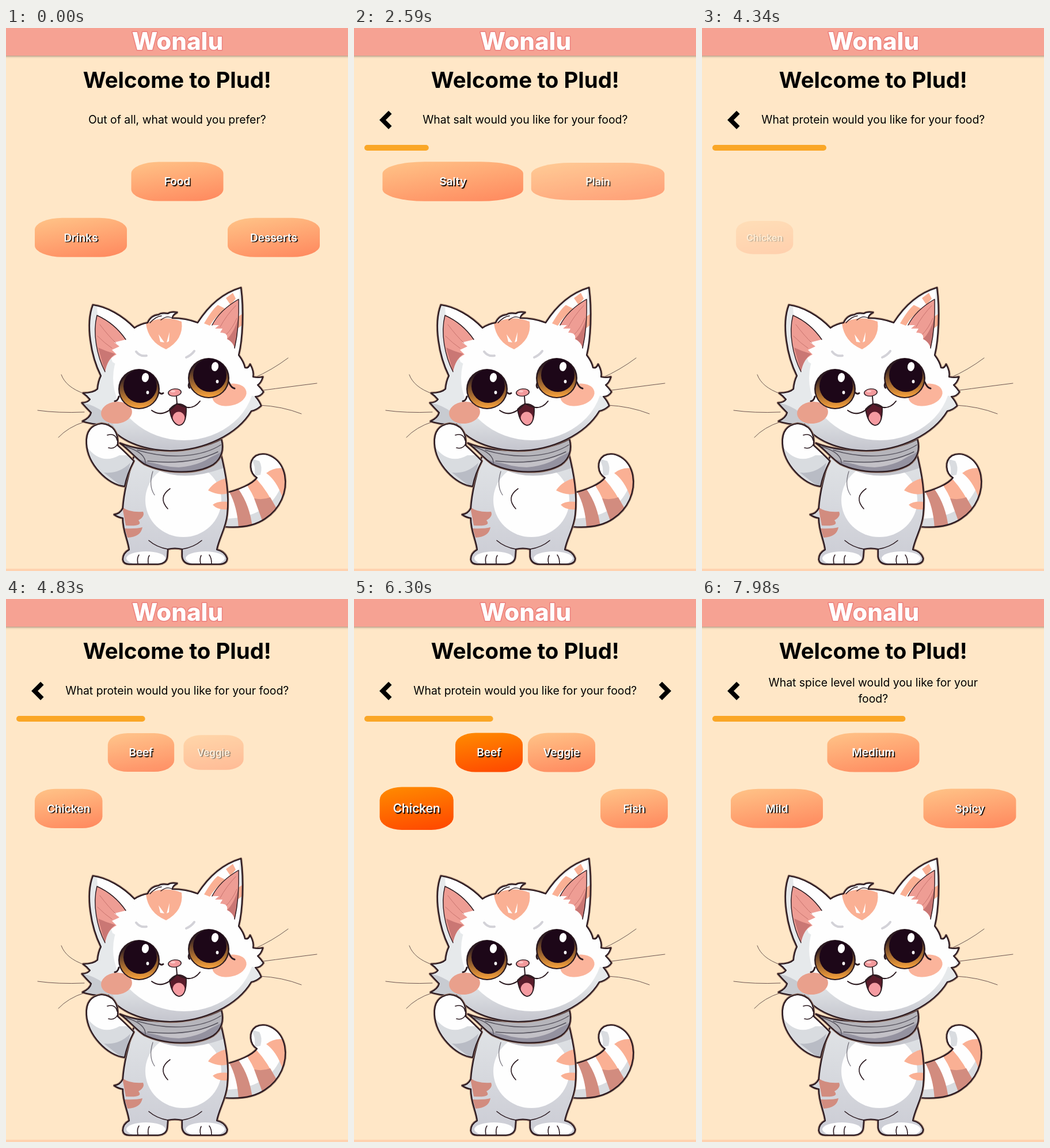
An HTML page with a canvas that plays this animation: 594x943 px, repeating every 8 s.

```html
<!DOCTYPE html>
<html lang="en">
<head>
<meta charset="utf-8">
<title>Menu quiz</title>
<style>
  html, body { margin: 0; width: 100%; height: 100%; overflow: hidden; background: #ffe7c7; }
  canvas { display: block; width: 594px; height: 943px; }
</style>
</head>
<body>
<canvas id="stage"></canvas>
<script>
const W = 594, H = 943, LOOP = 8000;
const FONT = 'Inter, "Open Sans", sans-serif';
const ratio = window.devicePixelRatio || 1;

function setup(canvas) {
  canvas.width = W * ratio;
  canvas.height = H * ratio;
  const context = canvas.getContext('2d');
  context.scale(ratio, ratio);
  return context;
}
let ctx = setup(document.getElementById('stage'));
const layer = setup(document.createElement('canvas'));

const INK = '#2b1a20', FRINGE = '#8d6d60', SALMON = '#fab094', DUSK = '#d28c7f';
const GREY = '#d9dce0', WHITE = '#fefefe';

const clamp = v => Math.max(0, Math.min(1, v));

// cubic-bezier(.25, .1, .25, 1)
function ease(x) {
  x = clamp(x);
  if (x === 0 || x === 1) return x;
  const bez = (s, a, b) => 3 * a * s * (1 - s) ** 2 + 3 * b * s * s * (1 - s) + s ** 3;
  let lo = 0, hi = 1;
  for (let i = 0; i < 20; i++) {
    const mid = (lo + hi) / 2;
    if (bez(mid, .25, .25) < x) lo = mid; else hi = mid;
  }
  return bez(lo, .1, 1);
}

const button = (label, x, y, w, opts = {}) => ({ label, x, y, w, ...opts });
const TOP = 266.5, LOW = 363.8;

// start: page appears; t0: its motion begins; arrow: "next" becomes available
const pages = [
  {
    start: 0, t0: -5000, bar: [0, 0], arrow: 1120, press: [[1540, 1680], [1820, 2030]],
    text: ['Out of all, what would you prefer?'],
    buttons: [
      button('Drinks', 130, LOW, 160),
      button('Food', 297.5, TOP, 160, { hover: [330, 1440], picked: 1120 }),
      button('Desserts', 465, LOW, 160)
    ]
  },
  {
    start: 2030, t0: 2030, bar: [0, .2], arrow: 3220, press: [[3990, 4200]], back: true,
    text: ['What salt would you like for your food?'],
    buttons: [
      button('Salty', 171.7, TOP, 243, { hover: [2930, 3410], picked: 3220 }),
      button('Plain', 423.5, TOP, 243, { hover: [3450, 3620] })
    ]
  },
  {
    start: 4200, t0: 4200, bar: [.2, .4], arrow: 5460, press: [[6790, 7070]], back: true,
    text: ['What protein would you like for your food?'],
    buttons: [
      button('Chicken', 108.7, LOW, 117, { hover: [5750, 6290], picked: 6090 }),
      button('Beef', 234.5, TOP, 117, { hover: [5030, 5720], picked: 5460 }),
      button('Veggie', 360.5, TOP, 117),
      button('Fish', 486.5, LOW, 117)
    ]
  },
  {
    start: 7070, t0: 7020, bar: [.4, .6], arrow: Infinity, press: [], back: true,
    text: ['What spice level would you like for your', 'food?'],
    buttons: [
      button('Mild', 130, LOW, 160),
      button('Medium', 297.5, TOP, 160),
      button('Spicy', 465, LOW, 160)
    ]
  }
];

function type(str, x, y, font, color) {
  ctx.font = font + ' ' + FONT;
  ctx.textAlign = 'center';
  ctx.fillStyle = color;
  ctx.fillText(str, x, y);
}

// Paint as one group, then blend the group at the given opacity.
function group(alpha, paint) {
  const base = ctx;
  ctx = layer;
  ctx.clearRect(0, 0, W, H);
  paint();
  ctx = base;
  ctx.globalAlpha = alpha;
  ctx.drawImage(layer.canvas, 0, 0, W, H);
  ctx.globalAlpha = 1;
}

function drawButton(b, i, t, t0) {
  const age = t - t0 - 40 - 200 * i;
  const p = clamp(age / 420);
  if (p === 0) return;
  let scale = .8 + .2 * p + .006 * Math.sin(Math.PI * clamp((age - 420) / 250));
  if (b.hover) scale *= 1 + .1 * (ease((t - b.hover[0]) / 180) - ease((t - b.hover[1]) / 180));

  const w = b.w, h = 68, a = 170 * Math.PI / 180;
  const len = (w * Math.sin(a) - h * Math.cos(a)) / 2;
  const dx = Math.sin(a) * len, dy = -Math.cos(a) * len;
  const on = t >= b.picked;

  group(p, () => {
    const shade = ctx.createLinearGradient(-dx, -dy, dx, dy);
    shade.addColorStop(0, on ? '#ff8c00' : '#ffc488');
    shade.addColorStop(1, on ? '#ff4500' : '#ff875d');
    ctx.save();
    ctx.translate(b.x, b.y);
    ctx.scale(scale, scale);
    ctx.fillStyle = shade;
    ctx.beginPath();
    ctx.roundRect(-w / 2, -h / 2, w, h, { x: w * .3, y: h * .3 });
    ctx.fill();
    ctx.shadowColor = '#000';
    ctx.shadowOffsetX = ctx.shadowOffsetY = 1.7 * ratio;
    ctx.shadowBlur = ratio;
    type(b.label, 0, 6.8, '600 19px', '#fff');
    ctx.restore();
  });
}

function chevron(x, dir, scale = 1) {
  ctx.save();
  ctx.translate(x, 159.8);
  ctx.scale(dir * scale, scale);
  ctx.beginPath();
  ctx.moveTo(-8, -13.2);
  ctx.lineTo(5.2, 0);
  ctx.lineTo(-8, 13.2);
  ctx.lineWidth = 7.8;
  ctx.lineJoin = 'miter';
  ctx.lineCap = 'butt';
  ctx.strokeStyle = '#000';
  ctx.stroke();
  ctx.restore();
}

function drawHeader() {
  ctx.save();
  ctx.shadowColor = 'rgba(70, 50, 40, .55)';
  ctx.shadowBlur = 4 * ratio;
  ctx.shadowOffsetY = ratio;
  ctx.fillStyle = '#f6a293';
  ctx.fillRect(-5, -5, W + 10, 53);
  ctx.restore();
  ctx.lineJoin = 'round';
  ctx.lineWidth = 3;
  ctx.strokeStyle = '#ec7f7c';
  ctx.font = '800 42px ' + FONT;
  ctx.textAlign = 'center';
  ctx.strokeText('Wonalu', 298, 38);
  type('Wonalu', 298, 38, '800 42px', '#fff');
}

function drawPage(page, t) {
  const first = page.text.length > 1 ? 151.6 : 166.2;
  page.text.forEach((line, i) => type(line, 297.3, first + i * 28.8, '400 19.4px', '#000'));
  if (page.back) chevron(54.8, -1);
  if (t >= page.arrow) {
    const big = page.press.some(([from, to]) => t >= from && t < to);
    chevron(540.3, 1, big ? 1.1 : 1);
  }
  const [from, to] = page.bar;
  const width = 559 * (from + (to - from) * ease((t - page.t0) / 300));
  if (width > 0) {
    ctx.fillStyle = '#faa727';
    ctx.beginPath();
    ctx.roundRect(18, 203, width, 10, 5);
    ctx.fill();
  }
  page.buttons.forEach((b, i) => drawButton(b, i, t, page.t0));
}

// --- cat ---
const shape = d => new Path2D(d);
const TAIL = shape('M380 808C405 802 428 792 436 781C423 773 421 752 434 743C452 734 478 747 484 777C489 805 476 835 450 852C430 866 405 868 380 866Z');
const BODY = shape('M222 745C212 780 205 805 203 834Q198 844 188 845Q195 850 203 851C203 875 212 888 214 906Q203 912 203 923Q204 931 214 931L264 931Q279 930 280 918L281 905Q293 902 306 905L306 918Q308 931 322 931L372 931Q384 930 384 921Q380 909 366 906C370 885 382 868 384 845C388 810 382 775 372 735Z');
const ARM = shape('M194 725Q196 690 166 687Q138 691 140 722C142 757 176 793 206 796Q210 775 222 752Q206 736 194 725Z');
const SCARF = shape('M198 721C245 740 330 738 374 714C379 732 374 748 360 758C330 776 275 774 240 757C226 748 212 730 198 721Z');
const HEAD = shape('M165 604C148 570 138 515 151 481C175 484 203 500 223 521Q234 514 246 512Q252 499 265 498Q270 494 281 496Q287 492 297 494Q288 499 289 504Q312 504 333 512C352 482 378 460 408 451C413 490 411 540 404 568Q413 580 415 590Q421 592 424 584Q431 597 429 606Q438 608 446 606Q443 616 437 620Q443 626 447 632Q442 640 433 640Q440 648 443 656Q434 664 426 665C402 705 345 734 285 734C235 733 195 715 178 688Q155 690 133 683Q146 677 148 668Q140 660 132 651Q142 651 146 645Q140 638 134 634Q152 634 159 627Q160 614 165 604Z');

function fill(path, color) {
  ctx.fillStyle = color;
  ctx.fill(typeof path === 'string' ? shape(path) : path);
}

function line(path, width = 2, color = INK) {
  ctx.lineWidth = width;
  ctx.strokeStyle = color;
  ctx.stroke(typeof path === 'string' ? shape(path) : path);
}

function oval(x, y, rx, ry, color, tilt = 0) {
  ctx.fillStyle = color;
  ctx.beginPath();
  ctx.ellipse(x, y, rx, ry, tilt, 0, 7);
  ctx.fill();
}

function fadeDown(y1, y2, from, to) {
  const g = ctx.createLinearGradient(0, y1, 0, y2);
  g.addColorStop(0, from);
  g.addColorStop(1, to);
  return g;
}

// Fill a part, paint its details inside the edge, then outline it.
function part(path, color, details) {
  line(path, 4.4, FRINGE);
  fill(path, color);
  ctx.save();
  ctx.clip(path);
  details();
  ctx.restore();
  line(path, 2.2);
}

function eye(x, y) {
  oval(x, y, 36, 35, INK);
  oval(x, y + 1, 33.5, 32, fadeDown(y - 22, y + 32, INK, '#f5a03c'));
  oval(x + 2, y - 5, 29, 29, '#1d0718');
  oval(x + 11, y - 20, 6, 8, '#fff', .2);
  oval(x + 15, y + 6, 2.4, 3, '#fff');
}

function drawTail() {
  part(TAIL, WHITE, () => {
    fill('M380 868L380 852C430 852 466 832 480 790L495 790L470 870Z', GREY);
    fill('M426 748Q434 760 432 778L442 776Q446 762 440 752Z', GREY);
    fill('M388 806L404 801Q424 830 428 868L404 870Q402 832 388 806Z', DUSK);
    fill('M418 793L434 782Q456 806 470 838L446 858Q436 820 418 793Z', SALMON);
    fill('M431 817Q446 820 459 815L472 838L446 858Z', DUSK);
    fill('M452 773Q466 762 484 765L492 800Q484 808 480 815Q470 786 452 773Z', SALMON);
  });
}

function drawBody() {
  part(BODY, fadeDown(750, 915, '#dfe2e5', '#cdced6'), () => {
    oval(308, 820, 66, 64, WHITE);
    oval(243, 921, 34, 12, WHITE);
    oval(346, 921, 34, 12, WHITE);
    fill('M226 740Q280 800 378 764L375 735Z', '#c3c4cb');
    fill('M386 781Q362 786 351 803Q370 813 386 808Z', SALMON);
    fill('M386 823Q368 821 359 828Q368 838 386 836Z', SALMON);
    fill('M202 832Q215 842 238 840Q242 848 230 855Q240 866 208 864Z', DUSK);
    fill('M206 869Q226 870 237 867Q234 884 211 885Z', DUSK);
  });
  line('M285 800Q263 815 281 835', 1.6);
  line('M255 770Q247 795 258 811', 1.3, '#77747d');
  line('M281 905Q262 902 248 890M306 905Q326 902 340 890', 1.6);
  line('M229 930Q227 920 231 915M247 930Q246 920 249 916M338 930Q336 921 339 916M357 930Q357 920 353 915', 1.6);
}

function drawArm() {
  part(ARM, WHITE, () => {
    fill('M140 727Q165 760 197 742L224 742L210 800Q160 790 140 727Z', GREY);
    fill('M170 772Q196 775 216 755L206 800Z', '#b9bcc5');
  });
  line('M176 707Q190 703 193 716M178 729Q189 732 194 722', 1.6);
}

function drawScarf() {
  part(SCARF, '#b6b5bb', () => {
    fill('M230 749C280 766 335 760 376 735L370 780L250 775Z', '#9492a0');
    fill('M250 752C290 760 330 755 366 736Q345 759 300 763Q270 762 250 752Z', '#c3c1c7');
  });
  line('M208 727Q244 738 242 757M228 733C290 752 345 742 373 724M246 752C300 758 340 750 368 736', 1.4, '#56535e');
}

function drawHead() {
  part(HEAD, fadeDown(660, 730, '#e6e9eb', '#c6c7cf'), () => {
    fill('M158 484Q200 492 226 518L250 505L300 492L335 512Q365 470 405 454L408 560L430 590L445 610L440 640L250 620L185 580L160 510Z', WHITE);
    oval(309, 608, 123, 108, WHITE);
    fill('M130 650Q180 660 190 700L130 690Z', '#c8cbd1');
    fill('M243 513Q275 497 305 510Q309 541 278 558Q247 545 243 513Z', SALMON);
    fill('M265 532L275 546L268 545ZM284 528L283 544L279 546Z', WHITE);
    fill('M344 513Q358 489 368 481L384 489Q365 498 354 517Z', SALMON);
    fill('M382 469L394 460L399 470L390 481Z', SALMON);
    fill('M402 502L413 495L413 514L402 522Z', SALMON);
  });
  fill('M158 499C150 530 158 570 172 597Q176 574 192 567L184 559L197 553L188 546L208 541C195 522 178 508 158 499Z', '#ee9d94');
  fill('M404 471C380 485 366 500 358 516L370 516L363 522L376 522L372 529Q386 529 384 540Q395 545 397 556C403 530 405 500 404 471Z', '#ee9d94');
  fill('M160 555Q175 562 190 566Q176 575 172 597Z', '#ca7774');
  fill('M403 505Q395 530 384 540Q394 545 397 556Q403 535 403 505Z', '#ca7774');
  line('M172 597C158 570 150 530 158 499C178 508 195 522 208 541M358 516C366 500 380 485 404 471C405 500 403 530 397 556', 1.4);
  line('M163 515Q178 535 191 547M159 535Q172 548 184 556M399 482Q382 500 372 519M401 504Q393 522 383 532', 1, '#c9746f');
  line('M250 512Q260 501 270 500M269 507Q280 498 289 504', 1.4);
}

function drawFace() {
  oval(192, 668, 27, 19, '#e9a08c', -.1);
  oval(388, 637, 30, 19, '#fbb49b', -.2);
  line('M226 562Q233 571 244 569M313 572Q322 568 327 561', 4, '#d3d2d8');
  eye(231, 627);
  eye(352, 608);
  line('M196 640Q194 648 189 648M266 633Q270 637 273 634M318 617Q316 623 319 625M387 615Q391 625 397 626', 3);
  oval(293, 633, 12, 7, INK, -.1);
  oval(293, 633, 10.5, 5.8, '#f39a9c', -.1);
  oval(290, 631, 4, 1.8, '#fbc9c8');
  fill('M284 662Q298 646 313 658Q314 690 300 690Q288 687 284 662Z', '#5a1c2b');
  oval(300, 678, 10.5, 11.5, '#f59ba1');
  line('M284 662Q298 646 313 658Q314 690 300 690Q288 687 284 662Z', 1.8);
  line('M296 640L297 652M253 664Q273 679 297 652Q322 668 337 648', 2);
}

function drawCat() {
  ctx.lineCap = ctx.lineJoin = 'round';
  line('M96 602Q104 624 136 635M55 664Q90 669 136 667M91 711Q108 693 136 684', 1, '#6b5550');
  line('M490 573Q462 594 430 608M540 617Q500 622 440 630M513 670Q480 657 440 655', 1, '#6b5550');
  drawTail();
  drawBody();
  drawScarf();
  drawHead();
  drawFace();
  drawArm();
}

function draw(t) {
  ctx.fillStyle = '#ffe7c7';
  ctx.fillRect(0, 0, W, H);
  ctx.fillStyle = '#ffd2b0';
  ctx.fillRect(0, 939, W, 4);
  drawHeader();
  type('Welcome to Plud!', 297.3, 103.6, '700 38.4px', '#000');
  drawCat();
  drawPage(pages.findLast(p => t >= p.start), t);
}

const begin = performance.now();
function tick() {
  draw((performance.now() - begin) % LOOP);
  requestAnimationFrame(tick);
}
tick();
</script>
</body>
</html>
```
